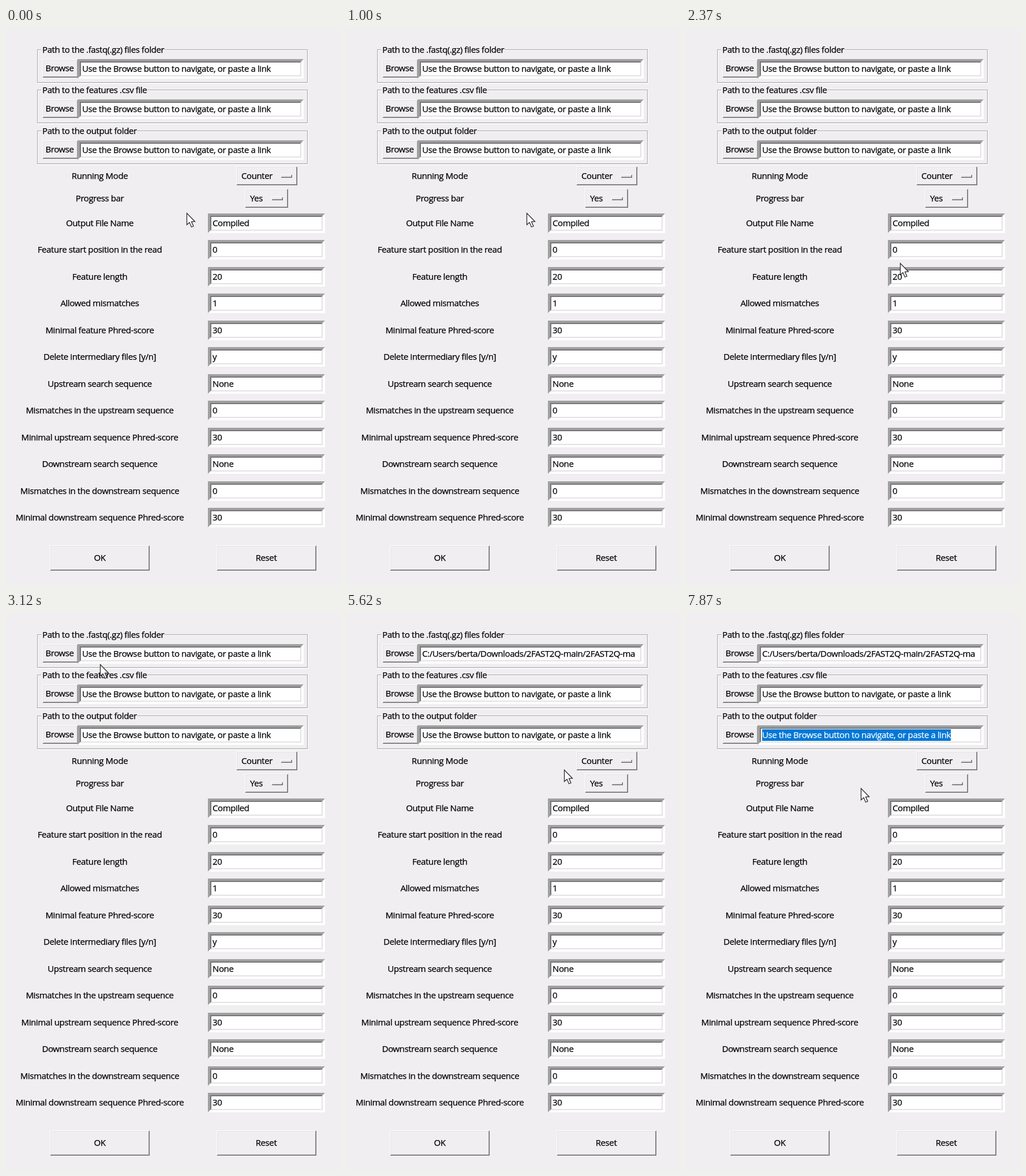
Write an HTML page with a canvas that moves like this. It is 579 by 967 pixels and loops after 8000 ms.

```html
<!DOCTYPE html>
<html lang="en">
<head>
<meta charset="utf-8">
<title>Settings form</title>
<style>
html, body { margin: 0; width: 100%; height: 100%; overflow: hidden; background: #f0eef0; }
canvas { display: block; }
</style>
</head>
<body>
<canvas id="stage" width="579" height="967"></canvas>
<script>
const ctx = document.getElementById('stage').getContext('2d');
const LOOP = 8000, STEP = 125;
const FACE = '#f0eef0', INK = '#000', GREY = '#a0a0a0', DARK = '#696969', PALE = '#e3e3e3';
const HINT = 'Use the Browse button to navigate, or paste a link';
const PATH = 'C:/Users/berta/Downloads/2FAST2Q-main/2FAST2Q-ma';

const groups = ['Path to the .fastq(.gz) files folder', 'Path to the features .csv file', 'Path to the output folder'];
const fields = [
  ['Output File Name', 'Compiled'],
  ['Feature start position in the read', '0'],
  ['Feature length', '20'],
  ['Allowed mismatches', '1'],
  ['Minimal feature Phred-score', '30'],
  ['Delete intermediary files [y/n]', 'y'],
  ['Upstream search sequence', 'None'],
  ['Mismatches in the upstream sequence', '0'],
  ['Minimal upstream sequence Phred-score', '30'],
  ['Downstream search sequence', 'None'],
  ['Mismatches in the downstream sequence', '0'],
  ['Minimal downstream sequence Phred-score', '30']
];

// Pointer path: time, x, y; the pointer is hidden between the two runs.
const runs = [
  [[0, 313, 321], [1250, 313, 321], [2375, 371, 408], [3125, 163, 89], [3500, 95, 66], [4000, 95, 66], [4370, 557, 200]],
  [[5620, 378, 272], [6375, 440, 232], [6750, 476, 218], [7000, 476, 218], [7250, 400, 215], [7500, 125, 214], [7875, 303, 304], [8000, 303, 304]]
];

function text(str, x, middle, align = 'left', color = INK) {
  ctx.textAlign = align;
  ctx.fillStyle = ctx.strokeStyle = color;
  ctx.lineWidth = 0.25;
  ctx.fillText(str, x, middle + 5);
  ctx.strokeText(str, x, middle + 5);
}

function polygon(points, color) {
  ctx.beginPath();
  points.forEach(([x, y]) => ctx.lineTo(x, y));
  ctx.closePath();
  ctx.fillStyle = color;
  ctx.fill();
}

function bevel(x, y, w, h, t, topLeft, bottomRight) {
  const r = x + w, b = y + h;
  polygon([[r, y], [r, b], [x, b], [x + t, b - t], [r - t, b - t], [r - t, y + t]], bottomRight);
  polygon([[x, b], [x, y], [r, y], [r - t, y + t], [x + t, y + t], [x + t, b - t]], topLeft);
}

function button(x, y, w, h, pressed = false) {
  ctx.fillStyle = FACE;
  ctx.fillRect(x, y, w, h);
  bevel(x, y, w, h, 1, pressed ? DARK : '#fff', pressed ? '#fff' : DARK);
  bevel(x + 1, y + 1, w - 2, h - 2, 1, pressed ? GREY : PALE, pressed ? PALE : GREY);
}

function entry(x, y, w, h) {
  ctx.fillStyle = '#fff';
  ctx.fillRect(x, y, w, h);
  bevel(x, y, w, h, 4, GREY, '#fff');
  bevel(x + 4, y + 4, w - 8, h - 8, 2, '#77777a', PALE);
}

function group(title, i, state) {
  const y = Math.round(38 + i * 70.3), mid = y + 33;
  ctx.lineWidth = 1;
  ctx.strokeStyle = '#fff';
  ctx.strokeRect(55.5, y + 0.5, 468, 58);
  ctx.strokeStyle = '#a6a6a8';
  ctx.strokeRect(54.5, y - 0.5, 468, 57);
  ctx.fillStyle = FACE;
  ctx.fillRect(61, y - 4, ctx.measureText(title).width + 3, 9);
  text(title, 63, y);

  const pressed = i === 0 && state.pressed;
  button(63, y + 16, 62, 32, pressed);
  text('Browse', 93 + pressed, mid - 1 + pressed, 'center');
  entry(124, y + 16, 392, 34);

  ctx.save();
  ctx.beginPath();
  ctx.rect(130, y + 20, 381, 26);
  ctx.clip();
  const value = i === 0 && state.pathShown ? PATH : HINT;
  text(value, 132, mid);
  const end = 132 + ctx.measureText(HINT).width;
  if (i === 2 && state.caret) {
    ctx.fillStyle = '#000';
    ctx.fillRect(end - 1, mid - 10, 2, 19);
  }
  if (i === 2 && state.selectFrom < end) {
    const from = Math.max(132, state.selectFrom);
    ctx.beginPath();
    ctx.rect(from, mid - 10, end - from, 20);
    ctx.clip();
    ctx.fillStyle = '#0078d7';
    ctx.fillRect(from, mid - 10, end - from, 20);
    text(value, 132, mid, 'left', '#fff');
  }
  ctx.restore();
}

function menu(label, value, mid, x, w) {
  text(label, 162.5, mid, 'center');
  button(x, mid - 17, w, 33);
  text(value, x + 9, mid);
  button(x + w - 29, mid - 3, 20, 6);
}

function arrow(x, y) {
  ctx.beginPath();
  [[0, 0], [0, 20], [4.6, 16], [8, 24], [11.5, 22.5], [8, 14.8], [14, 14.5]]
    .forEach(([dx, dy]) => ctx.lineTo(x + dx + 0.5, y + dy + 0.5));
  ctx.closePath();
  ctx.fillStyle = '#fff';
  ctx.fill();
  ctx.strokeStyle = '#2b2b2b';
  ctx.lineWidth = 1.3;
  ctx.stroke();
}

function beam(x, y) {
  ctx.fillStyle = '#222';
  ctx.fillRect(x, y - 8, 1.5, 17);
  for (const end of [y - 9, y + 8]) {
    ctx.fillRect(x - 3, end, 3, 1.5);
    ctx.fillRect(x + 1.5, end, 3, 1.5);
  }
}

function pointerAt(t) {
  const run = runs.find(r => t >= r[0][0] && t < r[r.length - 1][0]);
  if (!run) return null;
  const i = run.findIndex(p => p[0] > t);
  const [t0, x0, y0] = run[i - 1], [t1, x1, y1] = run[i];
  const k = (t - t0) / (t1 - t0);
  return [Math.round(x0 + (x1 - x0) * k), Math.round(y0 + (y1 - y0) * k)];
}

function inEntry(x, y) {
  return x > 124 && x < 516 && [54, 124, 195].some(top => y > top && y < top + 34);
}

function draw(time) {
  const t = Math.floor((time + 5) / STEP) * STEP % LOOP;
  const pointer = pointerAt(t);
  const state = {
    pressed: t >= 3375 && t < 3500,
    pathShown: t >= 5620,
    caret: t >= 6875 && t < 7125,
    selectFrom: t >= 7500 ? 132 : t > 7000 && pointer ? pointer[0] : Infinity
  };

  ctx.fillStyle = FACE;
  ctx.fillRect(0, 0, 579, 967);
  ctx.font = '15px "Open Sans", "Noto Sans", sans-serif';
  ctx.letterSpacing = '-0.4px';

  groups.forEach((title, i) => group(title, i, state));
  menu('Running Mode', 'Counter', 257, 399, 106);
  menu('Progress bar', 'Yes', 296, 414, 75);
  fields.forEach(([label, value], i) => {
    const mid = Math.round(339 + i * 46.45);
    text(label, 162.5, mid, 'center');
    entry(350, mid - 17, 203, 34);
    text(value, 358, mid);
  });
  button(76, 898, 173, 44);
  text('OK', 162.5, 920, 'center');
  button(365, 898, 173, 44);
  text('Reset', 451, 920, 'center');

  if (pointer) (inEntry(...pointer) ? beam : arrow)(...pointer);
}

function tick(now) {
  draw(now % LOOP);
  requestAnimationFrame(tick);
}
draw(0);
requestAnimationFrame(tick);
</script>
</body>
</html>
```
